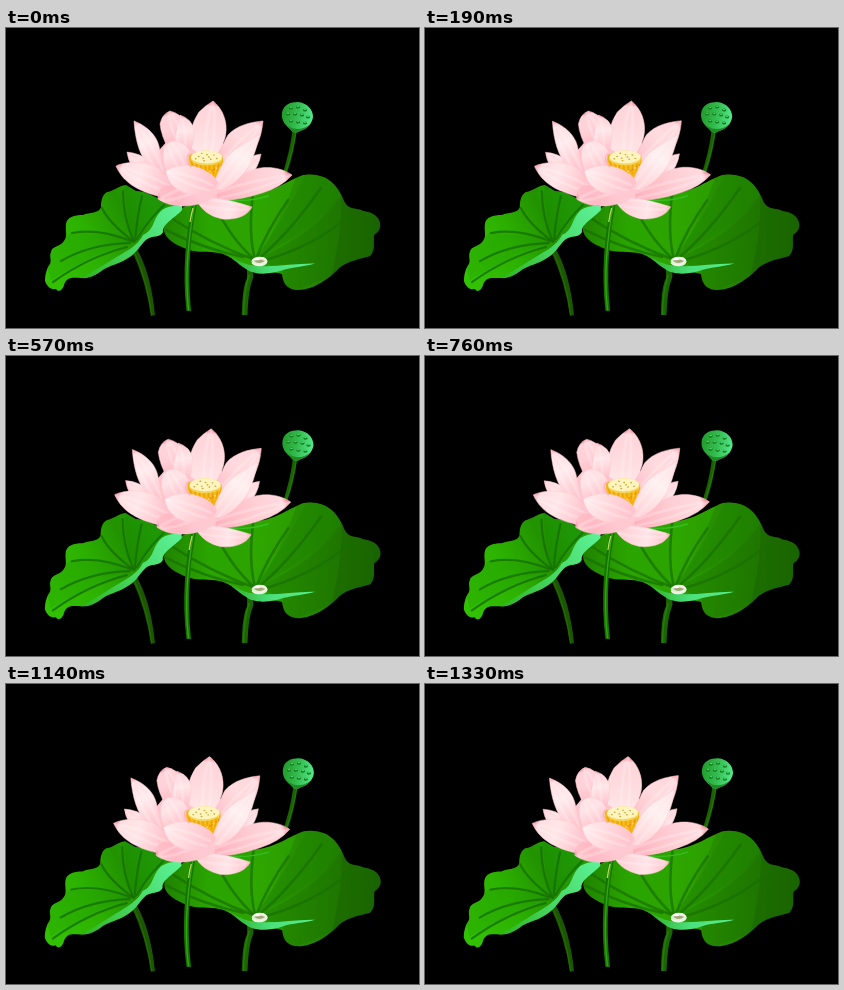
Animation of 413x300 px, one loop 1.52 s. Source, as an HTML page:

```html
<!DOCTYPE html>
<html lang="en">
<head>
<meta charset="utf-8">
<title>Lotus</title>
<style>
html, body { margin: 0; width: 100%; height: 100%; overflow: hidden; background: #000; }
svg { display: block; width: 100vw; height: 100vh; }
</style>
</head>
<body>
<svg id="stage" viewBox="0 0 413 300">
  <defs>
    <linearGradient id="leafL" gradientUnits="userSpaceOnUse" x1="45" y1="235" x2="150" y2="185">
      <stop offset="0" stop-color="#32c003"/><stop offset=".4" stop-color="#2cb000"/>
      <stop offset=".75" stop-color="#229200"/><stop offset="1" stop-color="#259f08"/>
    </linearGradient>
    <linearGradient id="leafR" gradientUnits="userSpaceOnUse" x1="160" y1="208" x2="372" y2="212">
      <stop offset="0" stop-color="#208400"/><stop offset=".2" stop-color="#2aa500"/><stop offset=".4" stop-color="#2ca300"/>
      <stop offset=".65" stop-color="#258a00"/><stop offset="1" stop-color="#1c6800"/>
    </linearGradient>
    <linearGradient id="rim" gradientUnits="userSpaceOnUse" x1="75" y1="248" x2="176" y2="182">
      <stop offset="0" stop-color="#2fb420"/><stop offset=".5" stop-color="#48d765"/><stop offset="1" stop-color="#5cf196"/>
    </linearGradient>
    <linearGradient id="lip" gradientUnits="userSpaceOnUse" x1="222" y1="230" x2="309" y2="236">
      <stop offset="0" stop-color="#2fae22"/><stop offset=".5" stop-color="#4be07c"/><stop offset="1" stop-color="#58ec8c"/>
    </linearGradient>
    <linearGradient id="pod" gradientUnits="userSpaceOnUse" x1="276" y1="86" x2="307" y2="91">
      <stop offset="0" stop-color="#219d2b"/><stop offset=".5" stop-color="#35bd50"/><stop offset="1" stop-color="#55ea8e"/>
    </linearGradient>
    <clipPath id="clipR"><use href="#shapeR"/></clipPath>
    <clipPath id="clipL"><use href="#shapeL"/></clipPath>
  </defs>
  <rect width="413" height="300" fill="#000"/>

  <g id="right">
    <path d="M286.500 101 L291 101 C289 116 286 130 281 145 L277 145 C282 128 285 116 286.500 101Z" fill="#1a6200"/>
    <path d="M290 103 C288 117 285 129 280 143" fill="none" stroke="#237a08" stroke-width="1"/>
    <path d="M276 85 C277 77 284 74 292 74 C301 75 307 81 307 89 C306 96 301 101 294 103 Q288 107 284 101 C279 97 275 92 276 85Z" fill="url(#pod)"/>
    <path d="M278 93 Q283 101 291 101 Q299 101 304 96 C301 100 298 102 294 103 Q288 107 284 101Z" fill="#1f8a22"/>
    <g id="holes"></g>
    <path d="M241 240 Q249 243 247 250 Q242 262 241.500 287 L236 287 Q236 260 241 250Z" fill="#1b6500"/>
    <path d="M243 247 Q237.500 265 237.500 287" fill="none" stroke="#237d08" stroke-width="1.500"/>
    <path id="shapeR" fill="url(#leafR)" d="M158 203 C160 211 169 217 183 222 C194 225 202 223 213 225 C225 227 235 237 246 242 C256 246 269 243 276 246 C277 257 283 262 292 262 C308 262 324 250 333 240 C343 232 355 231 364 228 C370 222 367 213 368 207 C372 204 375 201 374 195 C372 186 363 184 357 183 C350 179 343 183 338 173 C334 163 328 154 319 149.500 C310 146 299 145 292 149 C278 155 265 166 240 166 L185 176 C170 181 157 192 158 203Z"/>
    <g id="veinsR" clip-path="url(#clipR)"></g>
    <path d="M214 225 C228 228 233 236 248 237.500 C267 240 289 235 309 235.500 C297 239 287 239 277 242 C266 246 249 248 240 241 C230 235 226 228 214 225Z" fill="url(#lip)"/>
    <ellipse cx="253.500" cy="233.500" rx="8" ry="4.800" fill="#d9f5d0"/>
    <path d="M246 235 Q252 240 260 234 Q260 229 253 230" fill="none" stroke="#f8efe9" stroke-width="1.600"/>
    <path d="M248 233 Q253 237 259 233 Q253 230 248 233Z" fill="#a6a57a"/>
    <ellipse cx="251" cy="231" rx="3" ry="1.200" fill="#fff"/>
  </g>

  <g id="left">
    <path d="M126 223 L131 221 Q145 246 149 287 L145 288 Q140 253 126 223Z" fill="#1c5600"/>
    <path d="M128 223 Q142 255 145.500 287" fill="none" stroke="#226e08" stroke-width="1"/>
    <path id="shapeL" fill="url(#leafL)" d="M120 157 C112 158 106 164 101 164 C96 167 95 173 95 179 C93 186 83 184 77 187 C68 187 61 189 60 196 C59 203 62 208 58 213 C54 219 46 218 45 224 C43 228 46 232 44 236 C41 240 39 246 39 253 C41 258 44 262 50 261 C52 265 57 262 58 257 C61 248 67 250 75 250 C85 251 91 246 98 241 C105 237 114 236 122 230 C131 225 134 216 141 211 C148 207 154 210 157 204 C156 196 169 190 176 182 C173 175 164 174 157 173 C146 167 138 163 130 163Z"/>
    <g id="veinsL" clip-path="url(#clipL)"></g>
    <path d="M176 182 C169 190 156 196 157 204 C154 210 148 207 141 211 C134 217 131 225 122 230 C112 236 105 237 98 241 C88 249 80 250 75 250 C89 243 105 232 119 224 C130 218 136 210 137 207 C149 202 146 191 156 182 Q164 177 176 178Z" fill="url(#rim)"/>
  </g>

  <g id="flower">
    <path d="M186 176 L191 176 C185 205 181 240 185 283 L180.500 283 C176 244 180 207 186 176Z" fill="#177300"/>
    <path d="M188.500 177 C182 212 179 250 182.500 282" fill="none" stroke="#32a813" stroke-width="1.300"/>
    <path d="M187 180 Q185 187 184 194" fill="none" stroke="#b7dc55" stroke-width="1.300"/>
    <path d="M140 137 L162 112 L206 104 L240 138 L246 158 L214 174 L160 174Z" fill="#ffc3cc"/>
    <g id="petals"></g>
  </g>
</svg>
<script>
const NS = "http://www.w3.org/2000/svg";
const $ = id => document.getElementById(id);
const defs = document.querySelector("defs");

function add(parent, name, attrs) {
  const el = document.createElementNS(NS, name);
  for (const key in attrs) el.setAttribute(key, attrs[key]);
  parent.appendChild(el);
  return el;
}
const line = (parent, d, stroke, width, opacity = 1) =>
  add(parent, "path", { d, stroke, "stroke-width": width, opacity, fill: "none", "stroke-linecap": "round" });

// Leaves: soft facets, then veins fanning from the stem.
const facet = (id, d, fill, opacity) => add($(id), "path", { d, fill, opacity });
facet("veinsR", "M249 231 Q275 195 302 143 L340 160 Q307 203 249 231Z", "#1f8500", .5);
facet("veinsR", "M249 231 Q310 207 337 165 L380 190 L370 230 L276 268 L277 242Z", "#1c7000", .35);
facet("veinsR", "M335 166 Q337 200 325 250 L380 230 L380 180Z", "#174f00", .25);
facet("veinsR", "M249 231 Q239 204 248 160 L290 150 Q272 200 249 231Z", "#32ae00", .45);
["M247 231 Q205 216 165 190", "M237 229 Q195 220 160 202", "M248 231 Q225 211 208 176", "M249 231 Q242 206 247 166",
 "M250 231 Q260 204 282 172", "M251 232 Q282 207 315 160", "M256 233 Q307 219 343 188"
].forEach(d => line($("veinsR"), d, "#187000", 2.600, .7));
line($("veinsR"), "M210 170 Q236 176 262 168", "#35bd20", 1.500);

facet("veinsL", "M127 213 Q119 184 119 154 L170 172 Q143 190 127 213Z", "#118000", .3);
facet("veinsL", "M127 213 Q90 224 45 252 L39 230 L64 205 Q99 205 127 213Z", "#1f9000", .25);
["M128 214 Q117 190 117 163", "M127 213 Q103 195 96 180", "M125 213 Q92 200 66 205",
 "M124 215 Q84 216 55 233", "M121 219 Q82 229 47 254", "M129 213 Q131 189 136 168", "M131 211 Q144 190 158 177"
].forEach(d => line($("veinsL"), d, "#157000", 2.200, .8));

// Seed holes on the tall pod.
[[285, 80], [292, 79], [299, 82], [282, 86], [289, 86], [296, 87], [302, 89], [285, 93], [292, 94], [299, 95]]
  .forEach(([cx, cy]) => {
    add($("holes"), "ellipse", { cx, cy, rx: 2.100, ry: 1.500, fill: "#177d22" });
    add($("holes"), "ellipse", { cx, cy: cy - .7, rx: 1.400, ry: .7, fill: "#4fd173" });
  });

// A petal: outline, base point, tip point, colours from base to tip.
let count = 0;
function petal(d, [bx, by], [tx, ty], base = "#ffbac5", mid = "#ffe1e4", tip = "#ffd3d9", spot = true) {
  const n = count++, g = $("petals");
  const grad = add(defs, "linearGradient", { id: "g" + n, gradientUnits: "userSpaceOnUse", x1: bx, y1: by, x2: tx, y2: ty });
  const stops = [[0, base], [.55, mid], [.88, tip]];
  stops.push([.95, spot ? "#f3899b" : tip], [1, spot ? "#d95b72" : tip]);
  stops.forEach(([offset, color]) => add(grad, "stop", { offset, "stop-color": color }));
  add(add(defs, "clipPath", { id: "c" + n }), "path", { d });
  add(g, "path", { d, fill: `url(#g${n})`, stroke: "#ffc9d0", "stroke-width": .5 });
  const bands = add(g, "g", { "clip-path": `url(#c${n})` });
  const len = Math.hypot(tx - bx, ty - by), px = (by - ty) / len, py = (tx - bx) / len;
  for (const k of [-6, 6]) {
    const mx = (bx + tx) / 2 + px * k, my = (by + ty) / 2 + py * k;
    line(bands, `M${bx + px * k / 2} ${by + py * k / 2} Q${mx} ${my} ${tx} ${ty}`, "#fff5f5", 3, .25);
  }
}

petal("M121 124 Q133 125 142 132 L155 145 L126 138 Q122 132 121 124Z", [150, 143], [120, 123]);
petal("M255 126 Q245 127 234 135 L228 157 L244 148 Q253 139 255 126Z", [230, 153], [256, 125]);
petal("M154 96 Q156 86 164 83 Q173 85 180 94 L187 120 L164 124 Q155 108 154 96Z", [178, 120], [162, 82], "#ffb5c0", "#ffd2d8");
petal("M207 73 C216 80 223 94 219 110 Q215 125 203 132 L186 121 Q181 102 193 84 Q200 77 207 73Z", [202, 128], [207, 72], "#ffe6e8", "#ffd9dd", "#ffd5da");
petal("M174 87 Q186 91 188 102 Q188 115 183 128 L167 119 Q171 102 174 87Z", [176, 123], [174, 86], "#ffc0ca", "#ffe7e9");
petal("M128 93 C141 98 153 108 154 124 Q158 139 157 145 L143 138 C134 129 129 112 128 93Z", [154, 143], [127, 92], "#ffc1cb", "#ffebed", "#ffdce0");
petal("M257 93 C245 94 231 97 222 107 Q214 119 212 145 L224 145 C242 137 255 118 257 93Z", [212, 142], [258, 92], "#ffbdc7", "#ffdade", "#ffd8dd");
petal("M110 138 C121 133 137 133 151 139 Q162 148 166 165 L155 169 C136 164 118 157 110 138Z", [163, 161], [109, 138], "#ffbdc8", "#ffe6e8", "#ffdee1");
petal("M286 147 C275 139 260 138 249 141 Q225 149 210 164 L211 172 C228 173 243 169 256 165 Q276 159 286 147Z", [213, 167], [287, 147], "#ffb2be", "#ffd0d6", "#ffdadf");
petal("M191 173 C203 167 221 171 246 179 C241 189 228 192 216 191 Q198 187 191 173Z", [194, 174], [248, 181], "#ffcbd2", "#ffe5e8", "#ffc8d0");
petal("M152 171 Q151 160 160 157 L212 160 Q213 170 196 175 C181 180 163 179 152 171Z", [190, 160], [151, 173], "#ffc9d1", "#ffb9c4", "#ffc0c9");

// Flower heart.
const g = $("petals");
add(g, "path", { d: "M181 128 Q199 119 217 129 L217 143 Q213 151 206 153 Q191 149 182 139Z", fill: "#f5b20c" });
for (let i = 0; i < 15; i++) {
  const x = 183 + i * 2.300, y = 137 + 7 * Math.sin(i / 14 * Math.PI);
  line(g, `M${x} 133 L${x - (x - 203) * .15} ${y + 4}`, i % 2 ? "#eda010" : "#fac52c", 1);
  add(g, "circle", { cx: x, cy: y, r: .9, fill: i % 3 ? "#e88c10" : "#ffe070" });
}
add(g, "ellipse", { cx: 200.500, cy: 130, rx: 16, ry: 7.500, fill: "#f3d75c" });
add(g, "ellipse", { cx: 200.500, cy: 129, rx: 15.500, ry: 6.500, fill: "#fff4bf" });
for (let i = 0; i < 10; i++) {
  const a = i * 2.400, r = Math.sqrt((i + .4) / 10);
  add(g, "ellipse", { cx: 200.500 + 12 * r * Math.cos(a), cy: 129 + 4.800 * r * Math.sin(a), rx: 1, ry: .7, fill: "#bdab3d" });
}

petal("M158 119 Q164 112 171 113 Q181 116 184 124 Q180 134 186 141 L161 144 Q155 131 158 119Z", [176, 140], [162, 112], "#ffc4cd", "#ffe3e6", "#ffe0e4", false);
petal("M253 107 C241 114 225 121 217 135 Q210 147 206 161 L216 162 C239 151 249 132 253 107Z", [210, 160], [254, 105], "#ffd0d6", "#fff0f0", "#ffe2e5", false);
petal("M160 143 C170 136 186 136 198 142 Q207 146 212 154 Q211 162 199 164 C181 171 162 160 160 143Z", [205, 160], [159, 143], "#ffc3cc", "#ffdce0", "#ffe9eb", false);
line(g, "M183 126 Q178 131 185 139", "#f5aab7", 1.200, .7);

// Each part leans on the foot of its stem, held for 190 ms per pose.
const LOOP = 1520, HOLD = 190;
const parts = [["flower", -1.080, 182, 283], ["right", .3, 239, 287], ["left", -.4, 146, 287]];

function draw(ms) {
  const t = Math.floor((ms % LOOP) / HOLD) / (LOOP / HOLD - 1);
  const lean = t * (1.200 - .2 * t);
  for (const [id, deg, x, y] of parts) $(id).setAttribute("transform", `rotate(${deg * lean} ${x} ${y})`);
}

const start = performance.now();
function tick() {
  draw(performance.now() - start);
  requestAnimationFrame(tick);
}
draw(0);
requestAnimationFrame(tick);
</script>
</body>
</html>
```
